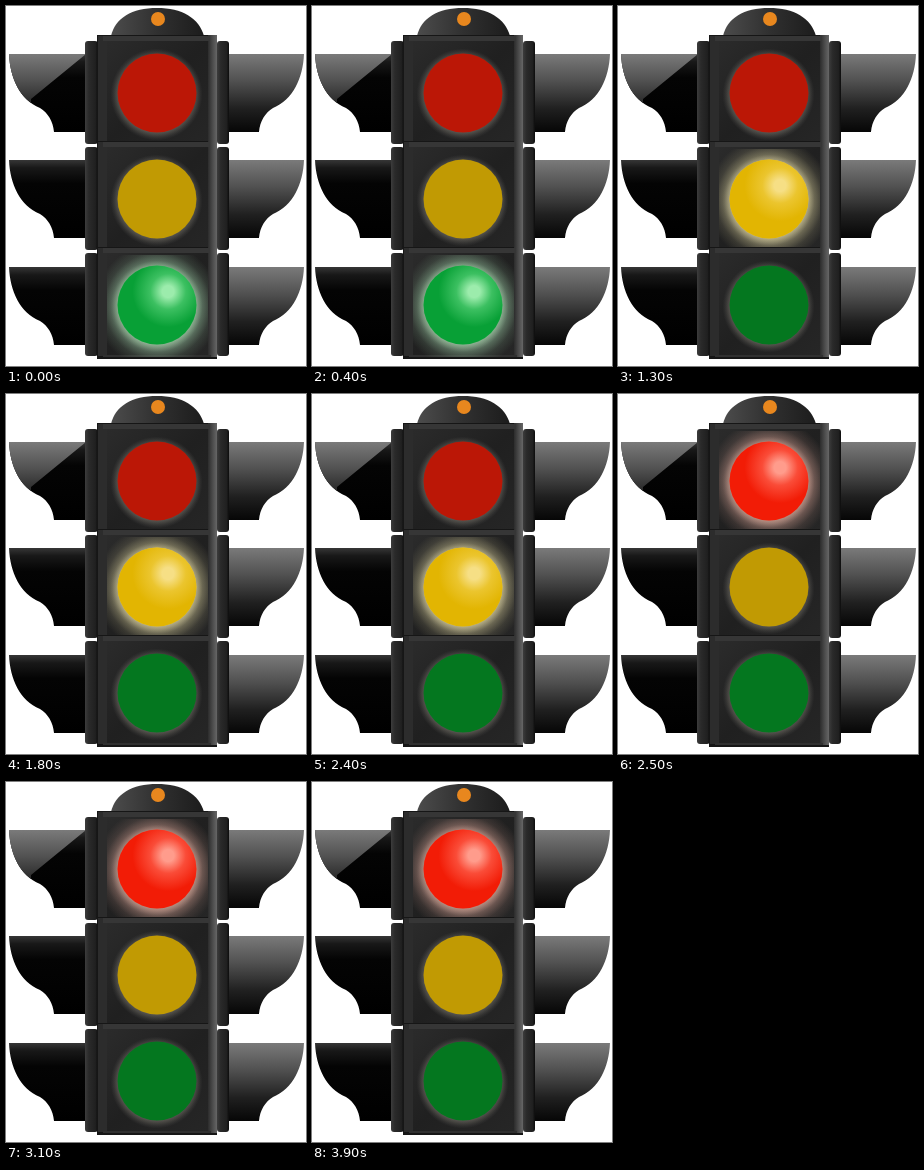
Recreate the animation shown at these times as an HTML page. Size 300 by 360 pixels, loop 4000 ms.

```html
<!DOCTYPE html>
<html lang="en">
<head>
<meta charset="utf-8">
<title>Traffic light</title>
<style>
  html, body { margin: 0; width: 100%; height: 100%; overflow: hidden; background: #fff; }
  svg { display: block; width: 300px; height: 360px; }
</style>
</head>
<body>
<svg id="stage" viewBox="0 0 300 360"></svg>
<script>
const stage = document.getElementById('stage');
const CYCLE = 4000;
const lamps = [
  { name: 'red', y: 87, off: '#bb1706', on: ['#ff9c8c', '#fa4c38', '#f21c06'], glow: '#e0a899', from: 2500, to: 4000 },
  { name: 'yellow', y: 193, off: '#c19a03', on: ['#f6df85', '#ebc52e', '#e2b502'], glow: '#e0d6a0', from: 1200, to: 2500 },
  { name: 'green', y: 299, off: '#04771f', on: ['#9cecac', '#3cc061', '#08a036'], glow: '#a8dcb2', from: 0, to: 1200 }
];

const stops = list => list.map(([at, color, alpha = 1]) =>
  `<stop offset="${at}" stop-color="${color}" stop-opacity="${alpha}"/>`).join('');
const linear = (id, x2, y2, ...list) =>
  `<linearGradient id="${id}" x2="${x2}" y2="${y2}">${stops(list)}</linearGradient>`;
const radial = (id, attrs, ...list) =>
  `<radialGradient id="${id}" ${attrs}>${stops(list)}</radialGradient>`;
const rect = (x, y, w, h, fill, rest = '') =>
  `<rect x="${x}" y="${y}" width="${w}" height="${h}" fill="${fill}" ${rest}/>`;

const defs = `<defs>
  ${linear('side', 1, 0, [0, '#3c3c3c'], [.3, '#2a2a2a'], [.8, '#202020'], [1, '#0c0c0c'])}
  ${linear('bevel', 1, 0, [0, '#2c2c2c'], [.6, '#505050'], [1, '#666'])}
  ${linear('panel', 1, 1, [0, '#2b2b2b'], [.5, '#202020'], [1, '#262626'])}
  ${linear('finLeft', 0, 1, [0, '#363636'], [.1, '#181818'], [.3, '#040404'], [1, '#000'])}
  ${linear('finRight', 0, 1, [0, '#7a7a7a'], [.35, '#505050'], [.7, '#202020'], [1, '#060606'])}
  ${linear('dome', 1, 0, [0, '#4c4c4c'], [.5, '#303030'], [1, '#1c1c1c'])}
  ${lamps.map(l => radial(l.name, 'cx=".64" cy=".33" r=".75"',
      [0, l.on[0]], [.1, l.on[0]], [.3, l.on[1]], [.6, l.on[2]], [1, l.on[2]])).join('')}
  ${lamps.map(l => radial(l.name + 'Glow', 'r=".62"',
      [.62, l.glow, .65], [.72, l.glow, .38], [.85, l.glow, .13], [1, l.glow, 0])).join('')}
  ${radial('rim', 'r=".5"', [.82, '#a7a294', .4], [.9, '#a7a294', .2], [1, '#777', 0])}
  <clipPath id="fin"><path d="M3 48H80V126H48C47 115 42 107 34 102C14 94 4 72 3 48Z"/></clipPath>
</defs>`;

function fins(y, lit) {
  const half = fill => `<g clip-path="url(#fin)">${rect(2, 48, 79, 78, fill)}</g>`;
  const sheen = `<g clip-path="url(#fin)">
    <path d="M2 48H80L25 93V126H2Z" fill="url(#finRight)"/></g>`;
  return `<g transform="translate(0 ${y})">${half('url(#finLeft)')}${lit ? sheen : ''}
    <g transform="translate(301 0) scale(-1 1)">${half('url(#finRight)')}</g></g>`;
}

function box(lamp) {
  const top = lamp.y - 54;
  return rect(79, top + 2, 13, 103, 'url(#side)', 'rx="3"') +
    rect(211, top + 2, 12, 103, 'url(#side)', 'rx="3"') +
    rect(91, top - 4, 120, 112, '#161616') +
    rect(92, top - 3, 9, 108, '#2c2c2c') +
    rect(202, top - 4, 9, 110, 'url(#bevel)') +
    rect(97, top - 3, 106, 5, '#363636') +
    rect(101, top + 2, 101, 102, 'url(#panel)') +
    rect(97, top + 104, 108, 2, '#303030') +
    `<circle cx="150.5" cy="${lamp.y + 1.5}" r="46" fill="url(#rim)"/>
     <circle cx="151" cy="${lamp.y}" r="39.5" fill="${lamp.off}"/>
     <g id="${lamp.name}On">
       ${rect(101, lamp.y - 50, 101, 102, `url(#${lamp.name}Glow)`)}
       <circle cx="151" cy="${lamp.y}" r="39.5" fill="url(#${lamp.name})"/>
     </g>`;
}

stage.innerHTML = defs +
  [0, 106, 213].map((y, i) => fins(y, i === 0)).join('') +
  '<path d="M105 30C109 12 126 2 151 2S193 12 198 30Z" fill="url(#dome)"/>' +
  '<circle cx="152" cy="13" r="7" fill="#e8871e"/>' +
  lamps.map(box).join('');

const lights = lamps.map(l => document.getElementById(l.name + 'On'));
const start = performance.now();

function draw() {
  const t = (performance.now() - start) % CYCLE;
  lamps.forEach((l, i) => {
    lights[i].style.display = t >= l.from && t < l.to ? '' : 'none';
  });
  requestAnimationFrame(draw);
}
draw();
</script>
</body>
</html>
```
